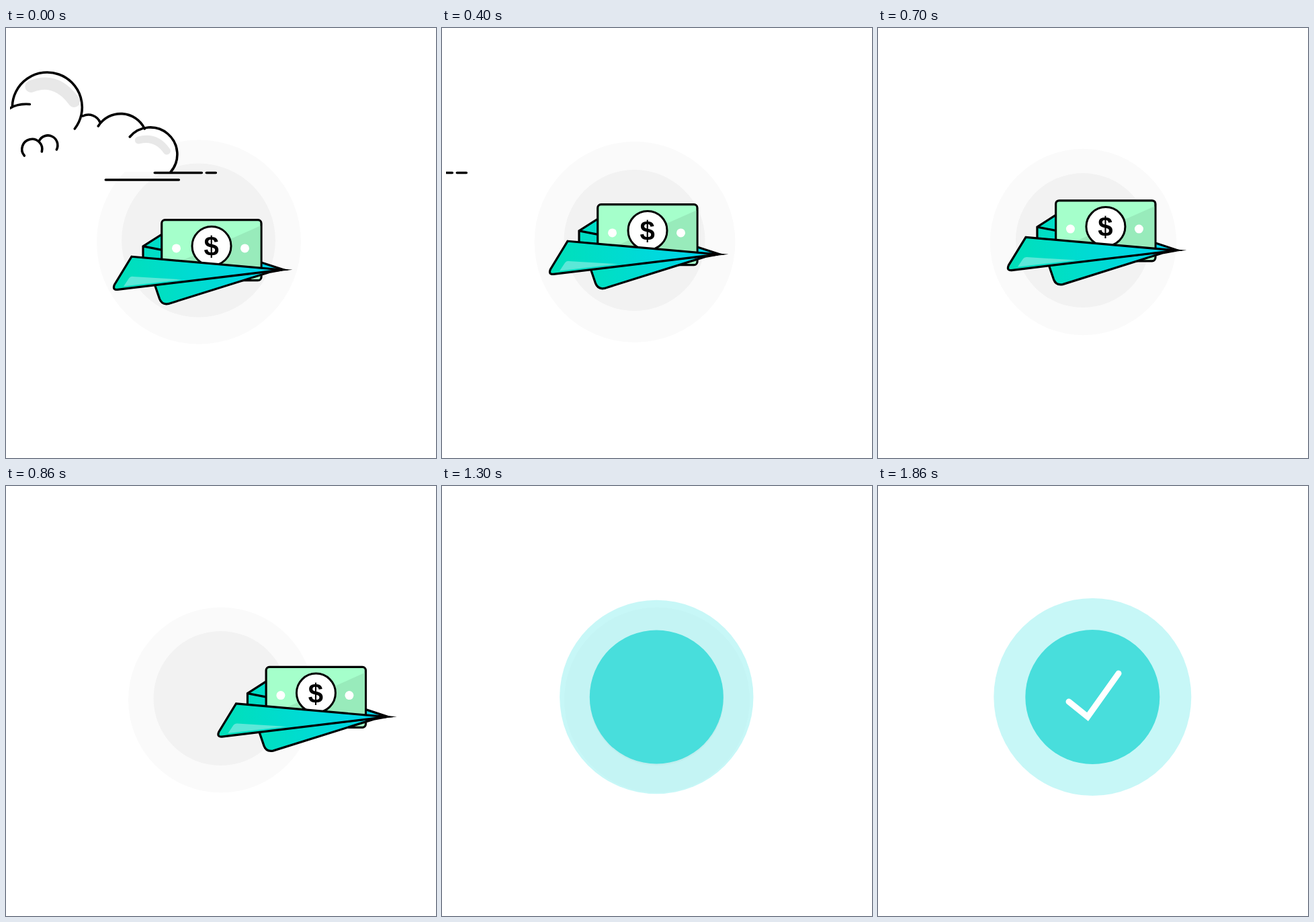
An HTML page that plays this animation: 640x640 px, repeating every 3060 ms.

```html
<!DOCTYPE html>
<html lang="en">
<head>
<meta charset="utf-8">
<title>Money sent</title>
<style>
  html, body { margin: 0; height: 100%; overflow: hidden; background: #fff; }
  svg { display: block; width: 100vw; height: 100vh; }
  .line { fill: none; stroke: #000; stroke-width: 3.6; stroke-linecap: round; }
  .shade { fill: none; stroke: #e8e8e8; stroke-linecap: round; }
  .plane { stroke: #000; stroke-width: 3.2; stroke-miterlimit: 14; }
  .flat { stroke: none; }
  text { font: bold 40px "Liberation Sans", Arial, sans-serif; text-anchor: middle; }
</style>
</head>
<body>
<svg viewBox="0 0 640 640">
  <defs>
    <linearGradient id="wing" gradientUnits="userSpaceOnUse" x1="160" y1="0" x2="400" y2="0">
      <stop offset="0" stop-color="#00e0b8"/>
      <stop offset=".65" stop-color="#00d9dc"/>
      <stop offset="1" stop-color="#00d4ee"/>
    </linearGradient>
    <linearGradient id="keel" gradientUnits="userSpaceOnUse" x1="222" y1="0" x2="390" y2="0">
      <stop offset="0" stop-color="#00e0c0"/>
      <stop offset="1" stop-color="#00d5ea"/>
    </linearGradient>
    <clipPath id="stage"><rect x="6" y="6" width="628" height="628"/></clipPath>
  </defs>

  <g clip-path="url(#stage)">
    <g id="halo">
      <circle id="haloOuter" cy="318.5" fill="#fafafa"/>
      <circle id="haloInner" cy="316" fill="#f2f2f2"/>
    </g>

    <g id="cloud">
      <path fill="#fff" d="M0 121L10 117A52 52 0 1 1 103 150L115 131A19 19 0 0 1 141 141L138 146A39.5 39.5 0 0 1 207 150A40 40 0 0 1 246 214H0Z"/>
      <path class="shade" stroke-width="18" d="M38 87Q75 72 102 109"/>
      <path class="shade" stroke-width="11" d="M198 167Q224 160 240 183"/>
      <path class="line" d="M4 121Q17 112 36 113.5M10 117A52 52 0 1 1 103 150M115 131A19 19 0 0 1 141 141M138 146A39.5 39.5 0 0 1 207 150M185 162A40 40 0 1 1 246 214"/>
      <path class="line" d="M28 190A15 15 0 1 1 54 184M50 168A14.5 14.5 0 1 1 76 181"/>
      <path class="line" d="M222 215.5H292M299 215.5H313M149 226H258"/>
    </g>

    <g id="plane" class="plane">
      <path fill="url(#wing)" d="M204 346V325L240 302L380 349L412 359.5L300 365Z"/>
      <path fill="none" d="M204 325L240 332"/>
      <rect x="231.7" y="285.7" width="148.3" height="90" rx="5" fill="#a5ffcb"/>
      <path class="flat" fill="#98ebbb" d="M378.4 294.5V370H262V346Z"/>
      <circle cx="306" cy="324.5" r="29" fill="#fff" stroke-width="3"/>
      <text class="flat" x="305.5" y="339">$</text>
      <g class="flat" fill="#fff">
        <circle cx="253.5" cy="328" r="6.5"/>
        <circle cx="355.5" cy="328" r="6.5"/>
      </g>
      <path fill="url(#keel)" d="M221 381L228.500 403Q232 412.500 242 410.500L392 363.500L411 360Z"/>
      <path fill="url(#wing)" d="M187 340.300L411 360L166 389.500Q158 390 161.500 382Z"/>
      <path class="flat" fill="#5ce8d8" d="M175 384.500L183 372.500Q185 369.500 189 370L262 374.500Z"/>
    </g>

    <g id="badge">
      <circle id="ring" cx="319.300" cy="314" fill="#48e4e4" opacity=".3"/>
      <circle id="disc" cx="319.300" cy="314" fill="#48dedc"/>
      <path id="tick" fill="none" stroke="#fff" stroke-width="9" stroke-linecap="round"/>
    </g>
  </g>
</svg>
<script>
const LOOP = 3060;
const TURN = 617;
const $ = id => document.getElementById(id);
const set = (id, attrs) => {
  for (const name in attrs) $(id).setAttribute(name, attrs[name]);
};
const linear = u => u;
const easeOut = u => 1 - (1 - u) ** 3;
const easeInOut = u => (1 - Math.cos(Math.PI * u)) / 2;

// Value moving from a to b between times t0 and t1, held outside them.
const tween = (t, t0, t1, a, b, ease = linear) =>
  a + (b - a) * ease(Math.min(1, Math.max(0, (t - t0) / (t1 - t0))));

function tickPath(progress) {
  const [x0, y0, x1, y1, x2, y2] = [284, 321, 312, 343.5, 358, 279];
  const first = Math.hypot(x1 - x0, y1 - y0);
  const second = Math.hypot(x2 - x1, y2 - y1);
  const drawn = progress * (first + second);
  const a = Math.min(1, drawn / first);
  const b = Math.max(0, (drawn - first) / second);
  let d = `M${x0} ${y0}L${x0 + (x1 - x0) * a} ${y0 + (y1 - y0) * a}`;
  if (b > 0) d += `L${x1 + (x2 - x1) * b} ${y1 + (y2 - y1) * b}`;
  return progress > 0 ? d : "";
}

function draw(t) {
  set("cloud", { transform: `translate(${-0.69 * t})` });

  const haloX = tween(t, 500, 860, 287, 320);
  const outer = t < 400 ? tween(t, 0, 400, 152, 149.5) : tween(t, 400, 720, 149.5, 138);
  set("haloOuter", { cx: haloX, r: outer });
  set("haloInner", { cx: haloX - 0.5, r: tween(t, 0, TURN, 114.5, 100) });
  set("halo", { opacity: tween(t, 1610, 1830, 1, 0) });

  const planeX = 32.5 * (Math.max(0, t - 500) / 200) ** 2.65;
  const planeY = t < TURN ? tween(t, 0, TURN, 0, -35.5) : tween(t, TURN, 1070, -35.5, 0);
  set("plane", {
    transform: `translate(${planeX} ${planeY})`,
    visibility: t < 1090 ? "visible" : "hidden"
  });

  const ring = t < 1480
    ? tween(t, 1100, 1480, 60, 154, easeOut)
    : tween(t, 1480, 1840, 154, 147);
  set("badge", { visibility: t < 1090 ? "hidden" : "visible" });
  set("ring", { r: ring });
  set("disc", { r: tween(t, 1100, 1360, 60, 100, easeOut) });
  set("tick", { d: tickPath(tween(t, 1350, 1790, 0, 1, easeInOut)) });
}

const start = performance.now();
function frame() {
  draw((performance.now() - start) % LOOP);
  requestAnimationFrame(frame);
}
frame();
</script>
</body>
</html>
```
